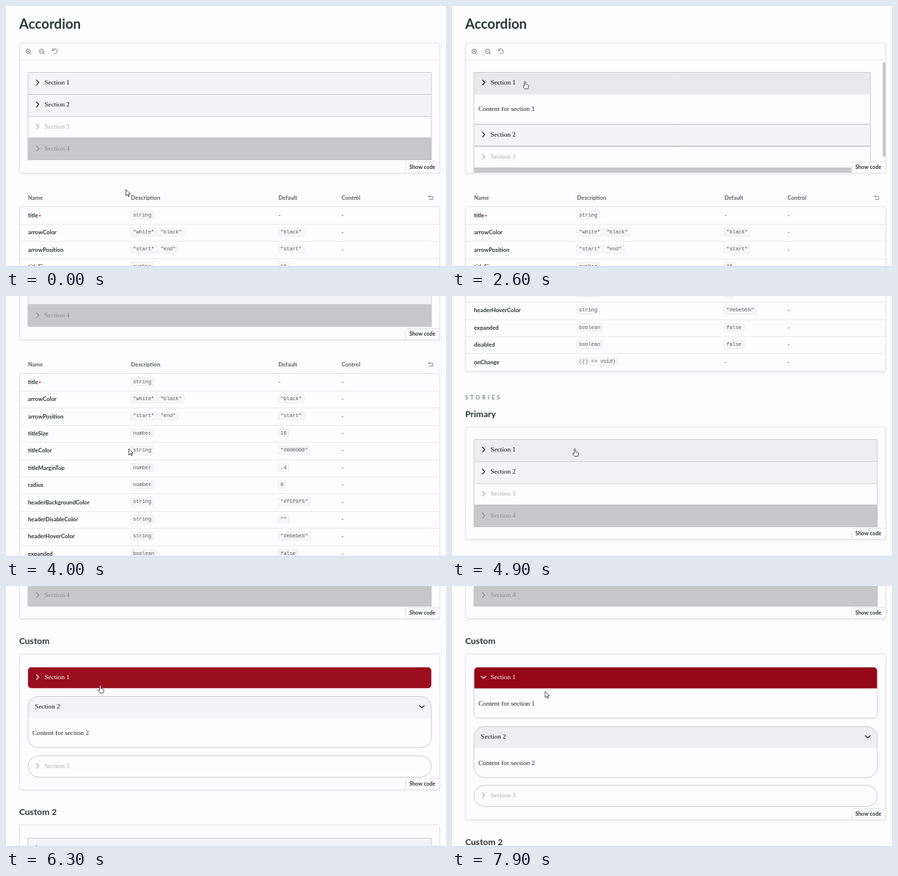
An HTML page with a canvas for the animation above (8 s loop, 600 px wide and 357 px high).

```html
<!DOCTYPE html>
<html lang="en">
<head>
<meta charset="utf-8">
<title>Accordion docs</title>
<style>
  html, body { margin: 0; width: 100%; height: 100%; overflow: hidden; background: #fdfcfe; }
  canvas { display: block; }
</style>
</head>
<body>
<canvas id="stage" width="600" height="357"></canvas>
<script>
const ctx = document.getElementById('stage').getContext('2d');
const LOOP = 8000, STEP = 100;
const PAGE = '#fdfcfe', INK = '#2e3438', MUTED = '#73797e', EDGE = '#e6e6ea', BORDER = '#cfced1', FAINT = '#b0afb1';
const SANS = 'Lato, sans-serif', SERIF = '"Liberation Serif", serif', MONO = '"Liberation Mono", monospace';
const LEFT = 30, RIGHT = 580;
const HEADER = 29.8, CONTENT = 40.5, GAP = 10.2, ROW = 23.4, NOTCH = 57.35;

// Smooth progress from 0 to 1 between two times.
function ease(t, from, to) {
  const p = Math.min(1, Math.max(0, (t - from) / (to - from)));
  return p * p * (3 - 2 * p);
}
// Fades in at one time and out at another.
const pulse = (t, on, off, fade = 200) => ease(t, on, on + fade) - ease(t, off, off + fade);
const blend = (a, b, p) => a + (b - a) * p;
const grey = level => `rgb(${level} ${level - 1} ${level + 1})`;
const headerFill = hover => grey(blend(244, 233, hover));

function text(label, x, middle, size, { font = SANS, weight = 700, color = INK, spacing = 0 } = {}) {
  ctx.font = `${weight} ${size}px ${font}`;
  ctx.letterSpacing = spacing + 'px';
  ctx.fillStyle = color;
  ctx.fillText(label, x, middle + size * 0.33);
  return ctx.measureText(label).width;
}
const serif = (label, x, y, color) => text(label, x, y, 9.17, { font: SERIF, weight: 400, color });

function line(points, color, width = 1) {
  ctx.beginPath();
  points.forEach(([x, y]) => ctx.lineTo(x, y));
  ctx.strokeStyle = color;
  ctx.lineWidth = width;
  ctx.stroke();
}

function box(x, y, w, h, radius, fill, stroke) {
  ctx.beginPath();
  ctx.roundRect(x, y, w, h, radius);
  if (fill) { ctx.fillStyle = fill; ctx.fill(); }
  if (stroke) { ctx.strokeStyle = stroke; ctx.lineWidth = 1; ctx.stroke(); }
}

function at(x, y, paint) {
  ctx.save();
  ctx.translate(x, y);
  paint();
  ctx.restore();
}

function card(top, bottom) {
  at(0, 0, () => {
    ctx.shadowColor = 'rgba(0,0,0,.1)';
    ctx.shadowBlur = 3;
    ctx.shadowOffsetY = 1;
    box(18.5, top, 573, bottom - top, 2.5, PAGE);
  });
  box(18.5, top, 573, bottom - top, 2.5, PAGE, EDGE);
}

function showCode(bottom) {
  box(545, bottom - 15, 46.5, 15, [2.5, 0], PAGE, EDGE);
  text('Show code', 550, bottom - 7.5, 7.3);
}

function chevron(x, y, turn, color) {
  at(x, y, () => {
    ctx.rotate(turn * Math.PI / 2);
    line([[-1.6, -3.6], [1.6, 0], [-1.6, 3.6]], color, 1.1);
  });
}

// Draws one collapsible section and returns its lower edge.
function section(n, top, { right = RIGHT, open = false, turn = 0, fill = headerFill(0), color = '#111',
                           border = BORDER, radius = 0, arrowEnd = false } = {}) {
  const y = Math.round(top) + 0.5, width = right - LEFT;
  const height = Math.floor(top + HEADER) + 0.5 - y;
  const extra = open ? CONTENT : 0;
  at(0, 0, () => {
    box(LEFT, y, width, height + extra, radius, PAGE);
    ctx.clip();
    ctx.fillStyle = fill;
    ctx.fillRect(LEFT, y, width, height);
  });
  box(LEFT, y, width, height + extra, radius, null, border);
  serif(`Section ${n}`, arrowEnd ? 39.3 : 52.5, y + 13, color);
  chevron(arrowEnd ? 567 : 43, y + 13.8, turn, color);
  if (open) serif(`Content for section ${n}`, 36, y + 49, '#222');
  return top + HEADER + extra;
}

function basicAccordion(top, { right, open, turn, hover = [0, 0, 0] }) {
  let y = section(1, top, { right, open, turn, fill: headerFill(hover[0]) });
  y = section(2, y, { right, fill: headerFill(hover[1]) });
  y = section(3, y, { right, fill: grey(blend(253, 243, hover[2])), color: FAINT });
  section(4, y, { right, fill: grey(200), color: '#8c8b8d', border: grey(197) });
}

function arc(x, y, radius, from, to) {
  ctx.beginPath();
  ctx.arc(x, y, radius, from, to);
  ctx.strokeStyle = MUTED;
  ctx.lineWidth = 0.9;
  ctx.stroke();
}

function zoomIcon(plus) {
  arc(0, 0, 3, 0, 7);
  line([[2, 2], [4.4, 4.4]], MUTED, 0.9);
  line([[-1.6, 0], [1.6, 0]], MUTED, 0.8);
  if (plus) line([[0, -1.6], [0, 1.6]], MUTED, 0.8);
}

function resetIcon() {
  arc(0, 0, 3.2, -2.6, 2);
  line([[-3.6, -3.8], [-3.3, -1.1], [-0.7, -1.4]], MUTED, 0.9);
}

function undoIcon() {
  line([[-3, -2], [3, -2], [3, 2], [-2, 2]], MUTED, 0.8);
  line([[-1, -4], [-3, -2], [-1, 0]], MUTED, 0.8);
}

function pills(x, y, labels) {
  if (labels === '-') return text('-', x, y, 7.7, { weight: 400 });
  for (const label of labels.split('|')) {
    const width = label.length * 4.14 + 6.4;
    box(x - 0.5, y - 5.8, width, 10.5, 1.7, '#f7f7f9', '#eeeef1');
    text(label, x + 2.8, y - 0.8, 6.9, { font: MONO, weight: 400, color: '#56595c' });
    x += width + 2;
  }
}

const PROPS = [
  ['title', 'string', '-'],
  ['arrowColor', '"white"|"black"', '"black"'],
  ['arrowPosition', '"start"|"end"', '"start"'],
  ['titleSize', 'number', '16'],
  ['titleColor', 'string', '"#000000"'],
  ['titleMarginTop', 'number', '-4'],
  ['radius', 'number', '0'],
  ['headerBackgroundColor', 'string', '"#f5f5f5"'],
  ['headerDisableColor', 'string', '""'],
  ['headerHoverColor', 'string', '"#ebebeb"'],
  ['expanded', 'boolean', 'false'],
  ['disabled', 'boolean', 'false'],
  ['onChange', '(() => void)', '-'],
];
const COLUMNS = { Name: LEFT, Description: 170.5, Default: 371.5, Control: 457.5 };

function propsTable(top) {
  for (const label in COLUMNS) text(label, COLUMNS[label], top - 12, 7.7, { color: '#5c6166' });
  at(579, top - 12, undoIcon);
  card(top, top + PROPS.length * ROW + 1);
  PROPS.forEach(([name, type, value], i) => {
    const y = top + (i + 0.5) * ROW;
    const rule = Math.round(y - ROW / 2) + 0.5;
    if (i) line([[19, rule], [591, rule]], '#ececef');
    const width = text(name, COLUMNS.Name, y, 7.75);
    if (!i) text('*', COLUMNS.Name + width, y + 1, 7.5, { font: MONO, color: '#e0392b' });
    pills(COLUMNS.Description, y, type);
    pills(COLUMNS.Default, y, value);
    text('-', COLUMNS.Control, y, 7.7, { weight: 400 });
  });
}

function mainPreview(state) {
  const { open } = state.main;
  text('Accordion', 18, 25.2, 18.6);
  card(50.5, 227.5);
  line([[19, 73.5], [591, 73.5]], '#e9e9ec');
  [() => zoomIcon(true), () => zoomIcon(false), resetIcon].forEach((icon, i) => at(30.2 + i * 18.3, 61.7, icon));
  at(0, 0, () => {
    ctx.beginPath();
    ctx.rect(19, 74, 572, 153);
    ctx.clip();
    basicAccordion(90.4, { ...state.main, right: open ? RIGHT - 9.5 : RIGHT });
    if (open) box(587.5, 77, 3.5, 128, 0, '#c3c2c5');
  });
  showCode(227.5);
}

// Draws a titled card around a body and returns the place of the next title.
function story(title, y, height, body) {
  const top = y + 34.7, bottom = top + height + 17.2;
  text(title, 18, y, 12);
  card(Math.floor(y + 17.5) + 0.5, Math.floor(bottom) + 0.5);
  body(top);
  showCode(Math.floor(bottom) + 0.5);
  return bottom + 30.5;
}

function customAccordion(top, { open, turn, hover }) {
  const red = `rgb(${blend(149, 154, hover[0])} ${blend(6, 14, hover[0])} ${blend(24, 31, hover[0])})`;
  let y = section(1, top, { open, turn, fill: red, color: '#fff', radius: 5, border: open && BORDER });
  y = section(2, y + GAP, { open: true, turn: 1, radius: 14, arrowEnd: true, fill: headerFill(hover[1]) });
  section(3, y + GAP, { fill: PAGE, color: FAINT, radius: 14.5 });
}

function stories({ primary, custom }) {
  text('STORIES', 18, 615, 7.2, { color: '#7b8389', spacing: 3.1 });
  const customHeight = 3 * HEADER + 2 * GAP + CONTENT * (custom.open ? 2 : 1);
  let y = story('Primary', 636.75, 4 * HEADER, top => basicAccordion(top, primary));
  y = story('Custom', y, customHeight, top => customAccordion(top, custom));
  story('Custom 2', y, 4 * HEADER, top => basicAccordion(top, {}));
}

const ARROW = new Path2D('M0 0V8.6L2 6.8L3.4 9.8L4.7 9.2L3.4 6.3H6Z');
const HAND = new Path2D('M-.9 .8Q0-.6 .9 .8V4.2L4.2 4.9Q5 5.2 4.9 6.3L4.2 10.4H-.4L-2.9 6.7Q-2.8 5.4-.9 6.6Z');
const MOVES = [
  { from: 400, to: 1700, x: 99.5, y: 102.5 },
  { from: 3200, to: 3500, x: 167.5, y: 208 },
  { from: 5900, to: 6250, x: 128.5, y: 135.5 },
  { from: 7400, to: 7600, x: 127, y: 200 },
  { from: 7700, to: 7900, x: 127, y: 143.5 },
];

function pointer(t, hand) {
  let x = 163.5, y = 250;
  for (const move of MOVES) {
    const p = ease(t, move.from, move.to);
    x = blend(x, move.x, p);
    y = blend(y, move.y, p);
  }
  at(x, y, () => {
    const shape = hand ? HAND : ARROW;
    ctx.fillStyle = '#fff';
    ctx.strokeStyle = '#333';
    ctx.lineWidth = 0.8;
    ctx.fill(shape);
    ctx.stroke(shape);
  });
}

const stateAt = t => ({
  scroll: NOTCH * (2.3 * ease(t, 3500, 3800) + 6 * ease(t, 3850, 4600)
    + 3 * ease(t, 4900, 5100) + 2 * ease(t, 5200, 5850)),
  main: {
    open: t >= 2600 && t < 3200,
    turn: pulse(t, 2600, 3200, 300),
    hover: [pulse(t, 1400, 3250), pulse(t, 1200, 1400), pulse(t, 3400, 4050)],
  },
  primary: { hover: [pulse(t, 4790, 5300), 0, 0] },
  custom: {
    open: t >= 6700,
    turn: ease(t, 6700, 7100),
    hover: [pulse(t, 6100, 7400), pulse(t, 7500, 7800)],
  },
});

function draw(t) {
  const state = stateAt(t);
  const { main, primary, custom } = state;
  const active = [...main.hover.slice(0, 2), ...primary.hover, ...custom.hover];
  ctx.fillStyle = PAGE;
  ctx.fillRect(0, 0, 600, 357);
  at(0, -Math.round(state.scroll), () => {
    mainPreview(state);
    propsTable(273.5);
    stories(state);
  });
  box(0, 354, 600, 3, 0, '#dde5f3');
  pointer(t, active.some(level => level > 0.5));
}

function frame() {
  draw(Math.floor(performance.now() / STEP) * STEP % LOOP);
  requestAnimationFrame(frame);
}
frame();
</script>
</body>
</html>
```
